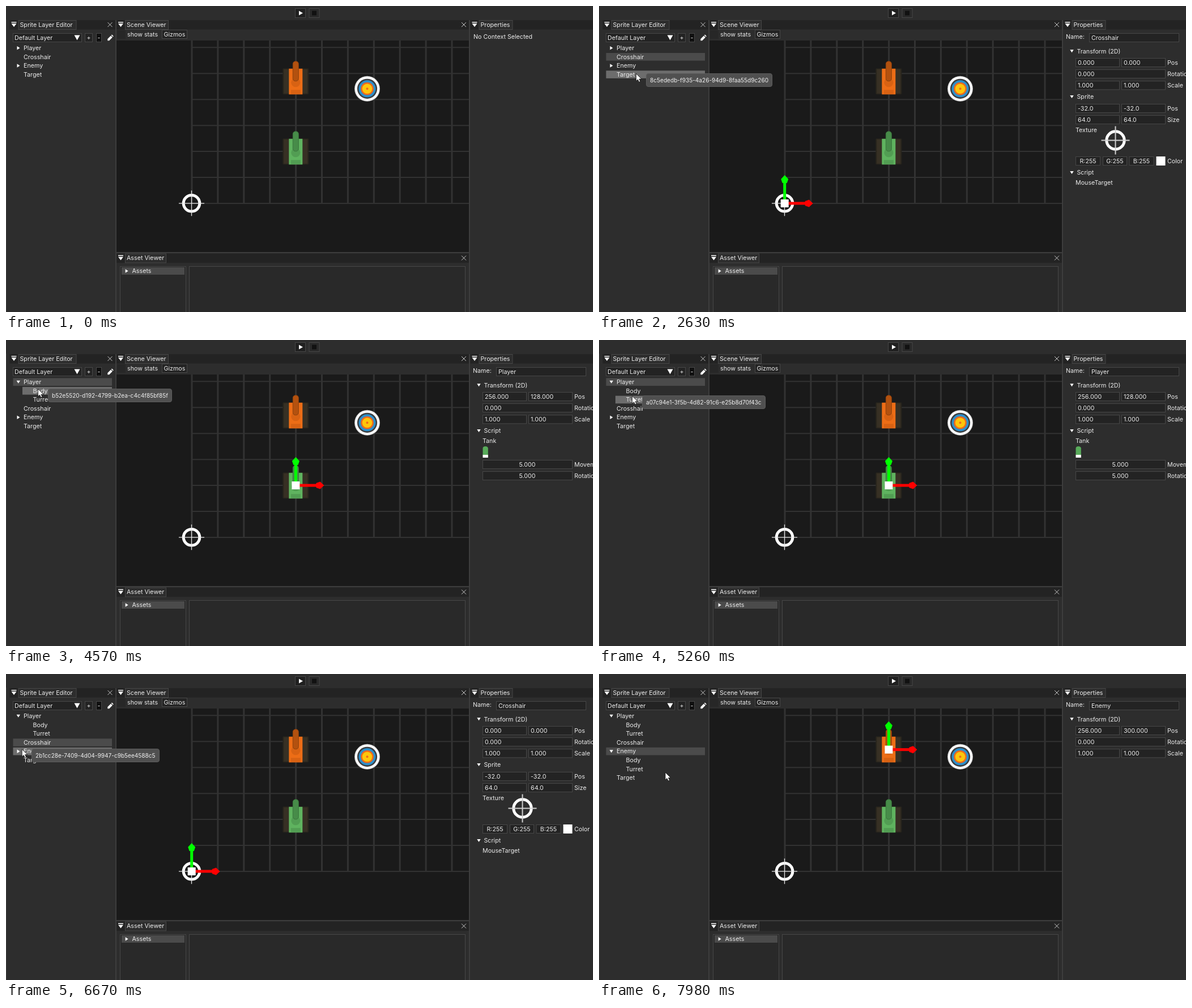
An HTML page for the animation above (8000 ms loop, 1036 by 541 pixels).

```html
<!DOCTYPE html>
<html lang="en">
<head>
<meta charset="utf-8">
<title>Scene editor</title>
<style>
html, body { margin: 0; width: 100%; height: 100%; overflow: hidden; background: #2d2d2d; }
svg { position: absolute; left: 0; top: 0; }
svg text { font: 10.7px Inter, "Open Sans", sans-serif; fill: #ececec; }
#tip {
  position: absolute; left: 0; top: 0; box-sizing: border-box; height: 24px; padding: 0 6px;
  border: 1px solid #5c5c5c; border-radius: 4px; background: #505050; color: #f0f0f0;
  font: 10.1px/22px Inter, "Open Sans", sans-serif; white-space: nowrap;
}
</style>
</head>
<body>
<svg width="1036" height="541" viewBox="0 0 1036 541">
  <g id="base"></g>
  <g id="live"></g>
  <path id="cursor" d="M0 0V13.2L3 10.5 5.2 15 7.5 14 5.4 9.6H9.6Z" fill="#fff" stroke="#111" stroke-width=".8"/>
</svg>
<div id="tip"></div>
<script>
const $ = id => document.getElementById(id);
const LOOP = 8000, TICK = 77, UNIT = 0.7175;
const LINE = '#474747', FIELD = '#232323', SELECTED = '#4b4b4b', HOVERED = '#6d6d6d';

// Drawing helpers
const rect = (x, y, w, h, fill, extra = '') =>
  `<rect x="${x}" y="${y}" width="${w}" height="${h}" fill="${fill}" ${extra}/>`;
const box = (x, y, w, h, fill = FIELD) =>
  rect(x + .5, y + .5, w - 1, h - 1, fill, `stroke="${LINE}"`);
const text = (x, y, s, anchor = 'start') =>
  `<text x="${x}" y="${y + 3.8}" text-anchor="${anchor}">${s}</text>`;
const path = (d, fill, extra = '') => `<path d="${d}" fill="${fill}" ${extra}/>`;
const stroke = (d, color, width) => path(d, 'none', `stroke="${color}" stroke-width="${width}"`);
const circle = (r, fill, extra = '') => `<circle r="${r}" fill="${fill}" ${extra}/>`;
const at = (x, y, s, scale = 1) => `<g transform="translate(${x} ${y}) scale(${scale})">${s}</g>`;
const arrow = (x, y, open) =>
  at(x, y, path(open ? 'M-3.2 -2.5H3.2L0 2.5Z' : 'M-2.3 -3.3V3.3L2.7 0Z', '#fff'));
const cross = (x, y) => stroke(`M${x - 4} ${y - 4}l8 8m0 -8l-8 8`, '#c8c8c8', 1);

function titleBar(x, y, w, tabWidth, title, closable) {
  return rect(x, y, w, 16.5, '#232323') +
    at(x + 7.5, y + 8, path('M-4.5 -5h9v1.6h-9zM-4.5 -2h9L0 4Z', '#fff')) +
    box(x + 15, y, tabWidth, 17, '#2d2d2d') + text(x + 18, y + 8, title) +
    (closable ? cross(x + w - 9.5, y + 8) : '');
}

// Sprites, centred on their own origin
const target = circle(22.5, '#b9b9b9') + circle(21.6, '#fff') + circle(17.6, '#3b3f42') +
  circle(15, '#2d8fcb') + circle(11.3, '#ee6a1c') + circle(8.8, '#fdc60a') + circle(2, '#ee6a1c');
const crosshair = (r, reach, hair, width) => circle(r, 'none', 'stroke="#fff" stroke-width="5"') +
  stroke(`M${-reach} 0H${reach}M0 ${-reach}V${reach}`, hair, width);
const tank = (body, shade, barrel, edge) =>
  rect(-23, -23, 46, 46, '#28251d', 'rx="2"') + rect(-21, -21.5, 42, 43, '#373024') +
  rect(-12, -22.5, 24, 45.5, body) + rect(-8.5, 15, 17, 7.5, shade) +
  circle(8, shade, 'cy="2"') +
  rect(-5, -35.5, 10, 35, barrel, `rx="4.5" stroke="${edge}"`);

function gizmo(x, y) {
  const head = 'M50 0L43 -6.5 36 -4V4L43 6.5Z';
  const axis = (color, turn) => `<g transform="rotate(${turn})">` +
    rect(0, -2.5, 40, 5, color) + path(head, color) + '</g>';
  return at(x, y, axis('#00ff00', -90) + axis('#ff0000', 0) + rect(-7, -7, 14, 14, '#fff'));
}

function scenery() {
  let s = rect(0, 0, 1036, 541, '#2d2d2d') + rect(0, 24, 1, 517, '#3c3c3c');
  s += box(510, 4, 19, 17, '#202020') + path('M517 8.5V16.5L524 12.5Z', '#fff');
  s += box(534.5, 4, 19, 17, '#292929') + rect(540, 8.5, 8, 8, '#111');

  s += titleBar(6.5, 25, 186.5, 103, 'Sprite Layer Editor', true);
  s += box(12, 48, 122, 16) + text(15, 56, 'Default Layer') + path('M120.5 51.5H130.5L125.5 60.5Z', '#fff');
  s += box(139, 48, 14, 16) + text(146, 56, '+', 'middle');
  s += box(159, 48, 10, 16, '#101010') + text(164, 56, '-', 'middle');
  s += path('M179.3 61.2V58.3L185 52.6 187.8 55.4 182.1 61.2ZM185.8 51.8L187 50.6 189.8 53.4 188.6 54.6Z', '#fff');

  s += titleBar(195, 25, 622.5, 77, 'Scene Viewer', true);
  s += rect(196, 43, 15, 15, '#272727') + text(214, 50, 'show stats');
  s += box(275, 42, 45, 16) + text(297.5, 50, 'Gizmos', 'middle');
  s += rect(195, 61, 622, 374, '#1a1a1a');
  let grid = '';
  for (let i = 0; i < 11; i++) grid += `M${328 + i * 45.9} 61V349`;
  s += stroke(grid, '#323232', 3);
  grid = '';
  for (let i = 0; i < 7; i++) grid += `M327 ${349 - i * 45.95}H817`;
  s += stroke(grid, '#323232', 2);
  s += at(511.3, 133.3, tank('#ed6d16', '#d86213', '#b3510f', '#8b400d'));
  s += at(511.3, 257.3, tank('#5fb35f', '#529d53', '#478c49', '#3a753c'));
  s += at(637.5, 146.3, target) + at(327.5, 348.8, crosshair(14.3, 22.5, '#e6e6e6', 1.3));

  s += titleBar(195, 437.5, 622.5, 73, 'Asset Viewer', true);
  s += box(201, 460, 117, 90, '#292929') + box(323, 460, 488, 90, '#292929');
  s += rect(204, 462, 111, 13, SELECTED) + arrow(213, 468.5, false) + text(222.5, 468.5, 'Assets');

  s += titleBar(819.5, 25, 216.5, 60, 'Properties', false);
  s += rect(193, 25, 2, 516, '#3d3d3d') + rect(817, 25, 2, 516, '#3d3d3d') + rect(195, 435, 622, 2, '#3d3d3d');
  return s;
}

// Hierarchy
const NODES = {
  Player: { id: '6d0f31b7-52ce-4b19-a6f3-71e9c20d845a', kids: ['b52e5520-d192-4799-b2ea-c4c4f85bf85f', 'a07c94e1-3f5b-4d82-91c6-e25b8d70f43c'], x: 256, y: 128 },
  Crosshair: { id: 'fcaea846-289a-4389-8eb0-84dd6efdcb72', x: 0, y: 0 },
  Enemy: { id: '2b1cc28e-7409-4d04-9947-c9b5ee4588c5', kids: ['e913b0d4-68a7-4c25-b7f1-05d2ca86e391', '47f8d2a6-b13e-4905-8ac7-d9e60b15c728'], x: 256, y: 300 },
  Target: { id: '8c5ededb-f935-4a26-94d9-8faa55d9c260', x: 400, y: 250 }
};
function listRows(opened) {
  const rows = [];
  for (const [name, node] of Object.entries(NODES)) {
    const open = opened.includes(name);
    rows.push({ name, id: node.id, kids: node.kids, open, indent: 0 });
    if (open) ['Body', 'Turret'].forEach((name, i) => rows.push({ name, id: node.kids[i], indent: 16.5 }));
  }
  rows.forEach((row, i) => row.y = 74.2 + i * 15.62);
  return rows;
}
const drawRow = (row, selected, hover) => {
  const fill = row === hover ? HOVERED : row.name === selected ? SELECTED : '';
  const left = 12.5 + row.indent;
  return (fill ? rect(left, row.y - 6.8, 187 - left, 13.6, fill) : '') +
    (row.kids ? arrow(21.8, row.y, row.open) : '') + text(31 + row.indent, row.y, row.name);
};

// Property panel
const header = (y, s) => arrow(834.5, y, true) + text(843.5, y, s);
const field = (x, y, w, s) => box(x, y - 8, w, 16) + text(x + 4, y, s);
const pair = (y, a, b, label) => field(841, y, 78, a) + field(922, y, 78, b) + text(1003, y, label);
const slider = (y, label) => box(841, y - 8, 159, 16) + text(920, y, '5.000', 'middle') + text(1003, y, label);
const check = (y, on, label) => box(841.5, y - 8, 17, 16) + text(862, y, label) +
  (on ? stroke(`M845 ${y}l3.5 4 7 -8.5`, '#fff', 2.2) : '');

function spriteSection(offset, picture) {
  const channels = [[841, 44, 'R'], [889, 43, 'G'], [935.5, 44, 'B']];
  return header(160.5, 'Sprite') + pair(181, offset, offset, 'Pos') + pair(201, '64.0', '64.0', 'Size') +
    text(841, 219, 'Texture') + at(911.5, 237.5, picture) +
    channels.map(([x, w, c]) => box(x, 266, w, 16) + text(x + w / 2, 274, c + ':255', 'middle')).join('') +
    rect(983.5, 266, 16, 16, '#fff') + text(1003, 274, 'Color');
}
const SECTIONS = {
  Player: header(160.5, 'Script') + text(841, 178.5, 'Tank') +
    path('M841.5 204V191.5Q841.5 188 846 188T850.8 191.5V204Z', '#58ab5a') + rect(841.5, 203, 9.3, 5, '#fff') +
    slider(220, 'Movement Speed') + slider(240, 'Rotation Speed'),
  Crosshair: spriteSection('-32.0', crosshair(15.7, 25, '#d0d0d0', 2)) +
    header(294.5, 'Script') + text(841, 312.5, 'MouseTarget'),
  Enemy: '',
  Target: spriteSection('0.0', `<g transform="scale(1.09)">${target}</g>`) + header(294.5, 'Physics') +
    check(315, true, 'Is Trigger') + check(335, false, 'Is Static') + check(355.3, true, 'Use Sprite Boundary') +
    text(841, 375.7, 'Velocity') + text(895, 375.7, 'x:0.0000') + text(949, 375.7, 'y:0.0000') +
    header(395.7, 'Script') + text(841, 413.5, 'Enemy')
};
function properties(name) {
  if (!name) return text(825, 54, 'No Context Selected');
  const { x, y } = NODES[name];
  return text(824, 54, 'Name:') + field(865, 56, 159, name) + header(79.7, 'Transform (2D)') +
    pair(100, x.toFixed(3), y.toFixed(3), 'Pos') +
    field(841, 120, 159, '0.000') + text(1003, 120, 'Rotation') +
    pair(140.3, '1.000', '1.000', 'Scale') + SECTIONS[name];
}

// Timeline: [ms, x, y] of the pointer tip, and [ms, selected node, opened nodes]
const POINTER = [
  [70, 36, 69], [380, 42, 79], [610, 47, 85], [690, 47, 85], [770, 46.5, 84.5], [1160, 46.5, 84.5],
  [1230, 48, 90], [1380, 55, 120.5], [1460, 57, 121], [1540, 57, 121], [1690, 63, 126], [1840, 67, 122],
  [2540, 67, 122], [2610, 65.5, 119.5], [3080, 65.5, 119.5], [3460, 51, 87], [3850, 14.5, 75], [4000, 14.5, 75],
  [4310, 53, 84], [4460, 54, 85], [4540, 56.5, 86.5], [4930, 59, 93], [5150, 59, 93], [5390, 58, 110],
  [5540, 58, 110], [5690, 57.5, 117], [5930, 57, 119.5], [6160, 57, 121], [6390, 57, 121], [6700, 18.5, 137],
  [6850, 18.5, 137], [7160, 43, 139], [7400, 44, 140], [7550, 47, 142], [7780, 84, 157], [7850, 115, 174],
  [7930, 117, 174]
];
const STATES = [
  [0, '', []], [1235, 'Crosshair', []], [3175, 'Target', []], [4015, 'Player', ['Player']],
  [5815, 'Crosshair', ['Player']], [6895, 'Enemy', ['Player', 'Enemy']]
];
function pointerAt(t) {
  const i = POINTER.findIndex(p => p[0] > t);
  if (i < 0) return POINTER.at(-1).slice(1);
  const [t0, x0, y0] = POINTER[Math.max(0, i - 1)], [t1, x1, y1] = POINTER[i];
  const k = Math.max(0, t - t0) / (t1 - t0 || 1);
  return [x0 + (x1 - x0) * k, y0 + (y1 - y0) * k];
}

let shown = '';
function render() {
  const t = performance.now() % LOOP;
  const [x, y] = pointerAt(Math.floor(t / TICK) * TICK);
  const visible = t >= 70;
  const [, selected, opened] = STATES.findLast(s => s[0] <= t);
  const rows = listRows(opened);
  const hover = visible && rows.find(r => y > r.y - 8 && y < r.y + 6);

  let s = rows.map(r => drawRow(r, selected, hover)).join('') + properties(selected);
  if (selected === 'Target') s += rect(614.8, 124, 46, 46, '#fff', 'opacity=".55"');
  if (selected) s += gizmo(327.7 + NODES[selected].x * UNIT, 348.9 - NODES[selected].y * UNIT);
  if (s !== shown) $('live').innerHTML = shown = s;

  $('cursor').setAttribute('transform', `translate(${x} ${y})`);
  $('cursor').style.display = visible ? '' : 'none';
  const tip = $('tip');
  tip.style.display = hover ? '' : 'none';
  if (hover) {
    tip.textContent = hover.id;
    tip.style.transform = `translate(${Math.round(x + 17)}px, ${Math.round(y - .8)}px)`;
  }
  requestAnimationFrame(render);
}
$('base').innerHTML = scenery();
render();
</script>
</body>
</html>
```
